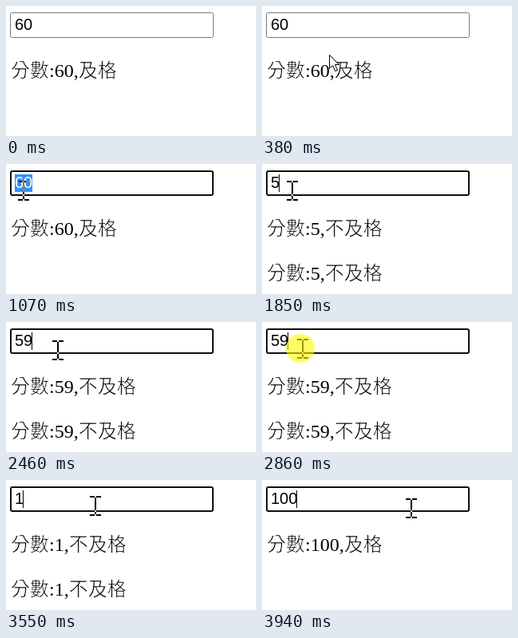
Animation, 313 px wide and 163 px high, one loop 4.01 s. Source, as an HTML page with a canvas:

```html
<!DOCTYPE html>
<html lang="zh-Hant">
<head>
<meta charset="utf-8">
<title>分數</title>
<style>
  html, body { margin: 0; width: 100%; height: 100%; overflow: hidden; background: #fff; }
  canvas { display: block; }
</style>
</head>
<body>
<canvas id="stage" width="313" height="163"></canvas>
<script>
const stage = document.getElementById('stage');
const ctx = stage.getContext('2d');
const LOOP = 4010;
const TEXT_X = 11, DIGIT = 11.12;
const BOX = { x: 5, y: 8, w: 255, h: 32 };
const ENTER = 70;

// Each edit selects the old value by dragging, then types a new one
const EDITS = [
  { press: 650, release: 750, type: 1700, gap: 380, word: '59' },
  { press: 2790, release: 3240, type: 3480, gap: 190, word: '100' }
];

// Pointer glides: begin, end, destination
const GLIDES = [
  [ENTER, 530, 75, 24],
  [690, 750, 11, 33],
  [980, 1070, 22, 34],
  [1220, 1300, 28, 34],
  [1640, 2160, 56, 35],
  [2430, 2460, 65, 36],
  [2710, 3170, 8, 30],
  [3240, 3800, 187, 36]
];

function smooth(p) {
  p = Math.max(0, Math.min(1, p));
  return p * p * (3 - 2 * p);
}

function pointerAt(t) {
  let x = 112, y = 172;
  for (const [begin, end, toX, toY] of GLIDES) {
    const part = smooth((t - begin) / (end - begin));
    x += (toX - x) * part;
    y += (toY - y) * part;
  }
  return { x: Math.round(x), y: Math.round(y) };
}

function valueAt(t) {
  const edit = EDITS.filter(e => t >= e.type).pop();
  return edit ? edit.word.slice(0, 1 + Math.floor((t - edit.type) / edit.gap)) : '60';
}

function selectionStart(t, value) {
  const edit = EDITS.find(e => t >= e.press && t < e.type);
  if (!edit) return value.length;
  const { x } = pointerAt(Math.min(t, edit.release - 1));
  return Math.max(0, Math.min(value.length, Math.round((x - TEXT_X) / DIGIT)));
}

function blended(mode, paint) {
  ctx.globalCompositeOperation = mode;
  paint();
  ctx.globalCompositeOperation = 'source-over';
}

function drawBorder(hover, focus) {
  const width = focus ? 2 : 1;
  ctx.lineWidth = width;
  ctx.strokeStyle = focus ? '#101010' : hover ? '#4f4f4f' : '#767676';
  ctx.beginPath();
  ctx.roundRect(BOX.x + width / 2, BOX.y + width / 2, BOX.w - width, BOX.h - width, 2);
  ctx.stroke();
}

function drawInput(t, value, focus) {
  const from = selectionStart(t, value);
  const split = TEXT_X + from * DIGIT;
  const baseline = 30;
  ctx.font = '20px "Liberation Sans", Arial, sans-serif';
  ctx.fillStyle = '#000';
  ctx.fillText(value.slice(0, from), TEXT_X, baseline);
  if (from < value.length) {
    ctx.fillStyle = '#3390ff';
    ctx.fillRect(Math.round(split), 13, Math.round((value.length - from) * DIGIT), 22);
    ctx.fillStyle = '#fff';
    ctx.fillText(value.slice(from), split, baseline);
  } else if (focus) {
    ctx.fillRect(Math.floor(split - 0.5), 13, 1, 22);
  }
}

// Han characters are thinned by a white outline to look like a light face
function drawLine(line, y) {
  let x = 6;
  for (const run of line.match(/[\d:,]+|[^\d:,]+/g)) {
    const latin = /\d|:|,/.test(run);
    ctx.font = latin ? '24px "Liberation Serif", serif' : '300 24px "Noto Sans CJK TC", "Noto Sans CJK", sans-serif';
    ctx.fillStyle = '#000';
    ctx.fillText(run, x, y);
    if (!latin) {
      ctx.lineWidth = 0.7;
      ctx.lineJoin = 'round';
      ctx.strokeStyle = '#fff';
      ctx.strokeText(run, x, y);
    }
    x += ctx.measureText(run).width;
  }
}

function drawResult(value) {
  const pass = value >= 60;
  const line = `分數:${value},${pass ? '及格' : '不及格'}`;
  drawLine(line, 89);
  if (!pass) drawLine(line, 145);
}

function drawArrow(x, y) {
  ctx.lineWidth = 1;
  ctx.fillStyle = '#fff';
  ctx.strokeStyle = '#000';
  const outline = new Path2D('M.5.5v17l4-4 3 7 3-1-3-7h5z');
  ctx.save();
  ctx.translate(x, y);
  ctx.fill(outline);
  ctx.stroke(outline);
  ctx.restore();
}

// The text beam inverts whatever lies under it
function drawBeam(x, y) {
  blended('difference', () => {
    ctx.fillStyle = '#fff';
    ctx.fillRect(x - 1, y - 11, 2, 21);
    for (const edge of [y - 13, y + 10]) {
      ctx.fillRect(x - 7, edge, 6, 2);
      ctx.fillRect(x + 1, edge, 6, 2);
    }
  });
}

function drawPress(x, y) {
  ctx.fillStyle = 'rgba(252, 248, 0, 0.6)';
  ctx.beginPath();
  ctx.arc(x - 3, y - 1, 18, 0, Math.PI * 2);
  ctx.fill();
}

function draw(t) {
  const value = valueAt(t);
  const focus = t >= EDITS[0].press;
  const { x, y } = pointerAt(t);
  const hover = x >= BOX.x && x < BOX.x + BOX.w && y >= BOX.y && y < BOX.y + BOX.h;
  ctx.fillStyle = '#fff';
  ctx.fillRect(0, 0, stage.width, stage.height);
  drawBorder(hover, focus);
  drawInput(t, value, focus);
  drawResult(value);
  if (t >= ENTER) (hover ? drawBeam : drawArrow)(x, y);
  if (EDITS.some(e => t >= e.press && t < e.release)) drawPress(x, y);
}

const begin = performance.now();
function tick() {
  draw((performance.now() - begin) % LOOP);
  requestAnimationFrame(tick);
}
tick();
</script>
</body>
</html>
```
